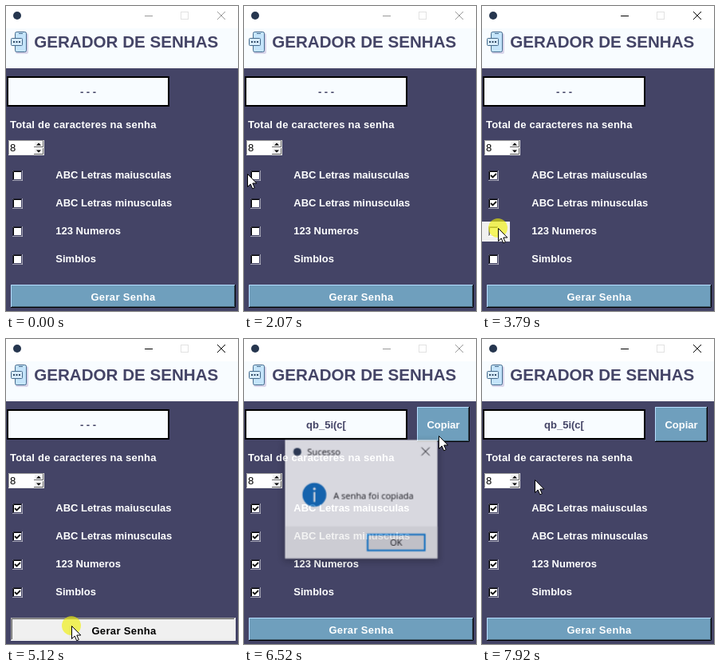
Recreate the animation shown at these times as an HTML page. Size 291 by 382 pixels, loop 7990 ms.

```html
<!DOCTYPE html>
<html lang="pt">
<head>
<meta charset="utf-8">
<title>Gerador de senhas</title>
<style>
  html, body { margin: 0; width: 100%; height: 100%; overflow: hidden; background: #446; }
  svg { display: block; width: 291px; height: 382px; }
  text { font: bold 13px "Liberation Sans", Arial, sans-serif; fill: #feffff; white-space: pre; }
  .mid { text-anchor: middle; }
  .dark { fill: #446; }
  .black { fill: #000; }
  #heading { font-size: 20.6px; }
  #total { letter-spacing: .22px; }
  #gerar text { letter-spacing: .35px; }
  #count { font-weight: normal; }
  #dialog { transform-origin: 147px 200.5px; }
  #dialog text { font: 11.1px "Open Sans", "Noto Sans", sans-serif; fill: #111; }
  .line { fill: none; stroke-width: 1; }
</style>
</head>
<body>
<svg viewBox="0 0 291 382" xmlns="http://www.w3.org/2000/svg">
  <defs>
    <filter id="soft" x="-20%" y="-20%" width="140%" height="140%"><feGaussianBlur stdDeviation="5"/></filter>
    <path id="buttons" class="line" d="M174 12.5H184M265 7L275 17M275 7L265 17"/>
  </defs>

  <rect width="291" height="382" fill="#446"/>
  <rect width="291" height="78" fill="#f8fcff"/>
  <rect width="291" height="28" fill="#fff"/>

  <circle cx="14" cy="12" r="5" fill="#26364f"/>
  <rect class="line" x="219.5" y="7.5" width="9" height="9" stroke="#e2e2e2"/>
  <use href="#buttons" stroke="#999"/>
  <use href="#buttons" id="active" stroke="#000"/>

  <g id="phone">
    <rect x="12" y="34" width="16" height="26" rx="2.5" fill="#d9d5ea"/>
    <rect x="11.5" y="32.5" width="14" height="25" rx="2" fill="#c4e4fa" stroke="#456a8c"/>
    <path d="M16 34.5H21" stroke="#456a8c"/>
    <rect x="6.5" y="40.5" width="14" height="9" rx="1" fill="#d8ecfb" stroke="#456a8c"/>
    <path d="M9 45H19" stroke="#2f4a66" stroke-width="2" stroke-dasharray="2 1.5"/>
  </g>
  <text id="heading" class="dark" x="35.2" y="52">GERADOR DE SENHAS</text>

  <rect x="2" y="89" width="202" height="36" fill="#f8fcff" stroke="#000" stroke-width="2"/>
  <text id="empty" class="mid dark" x="103" y="112">- - -</text>
  <text id="secret" class="mid dark" x="103" y="112">qb_5i(c[</text>
  <text id="total" x="5" y="153">Total de caracteres na senha</text>

  <g id="widgets"></g>

  <g id="dialog">
    <rect x="49" y="128" width="196" height="151" fill="#000" opacity=".3" filter="url(#soft)"/>
    <rect x="51" y="126" width="192" height="149" fill="#fff"/>
    <rect x="51" y="235" width="192" height="40" fill="#f0f0f0"/>
    <circle cx="66.5" cy="141" r="5" fill="#26364f"/>
    <text x="79" y="145">Sucesso</text>
    <path class="line" d="M223 135.5L233 145.5M233 135.5L223 145.5" stroke="#000"/>
    <circle cx="88" cy="195" r="15" fill="#0a6cc0"/>
    <path d="M88 191.5V204" stroke="#fff" stroke-width="2.2"/>
    <circle cx="88" cy="187.5" r="1.6" fill="#fff"/>
    <text x="112" y="200">A senha foi copiada</text>
    <rect x="155" y="245" width="72" height="20" fill="#e1e1e1" stroke="#0078d7" stroke-width="2"/>
    <rect id="okHover" x="156" y="246" width="70" height="18" fill="#e5f1fb"/>
    <text class="mid" x="191" y="259">OK</text>
  </g>

  <g id="cursor">
    <circle id="click" r="12" fill="#f0f000" fill-opacity=".62"/>
    <path d="M.5 .5V16.5L4.2 13L6.7 18.8L9.3 17.7L6.8 12H11.8Z" fill="#fff" stroke="#000"/>
  </g>
</svg>

<script>
const $ = id => document.getElementById(id);

// ---- widgets ----
// A relief lists [top-left, bottom-right] colours from the outer edge inwards.
const RAISED = [['#fff', '#696969'], ['#e3e3e3', '#a0a0a0']];
const SUNKEN = [['#a0a0a0', '#fff'], ['#696969', '#e3e3e3']];
const BLUE = [['#b7deff', '#000'], ['#6f9fbd', '#435f71']];
const DARK = [['#29293d', '#a1a1b2'], ['#000', '#446']];
const THIN = [['#a0a0a0', '#e3e3e3']];
const ARROW = [['#fff', '#696969']];

const bevel = (x, y, w, h, fill, relief) =>
  `<rect x="${x}" y="${y}" width="${w}" height="${h}" fill="${fill}"/>`
  + relief.map(([tl, br], i) => {
    const [l, t, r, b] = [x + i + .5, y + i + .5, x + w - i - .5, y + h - i - .5];
    return `<path class="line" stroke="${tl}" d="M${l} ${b}V${t}H${r}"/>
      <path class="line" stroke="${br}" d="M${l - .5} ${b}H${r}V${t - .5}"/>`;
  }).join('');

const button = (name, label, x, y, w, h) => {
  const face = (state, fill, relief, shift, cls) =>
    `<g id="${name}${state}">${bevel(x, y, w, h, fill, relief)}
     <text class="mid ${cls}" x="${x + w / 2 + shift}" y="${y + h / 2 + 5 + shift}">${label}</text></g>`;
  return `<g id="${name}">`
    + face('Idle', '#6f9fbd', BLUE, 0, '')
    + face('Hover', '#f0f0f0', RAISED, 0, 'black')
    + face('Press', '#f0f0f0', SUNKEN, 1, 'black') + '</g>';
};

const option = (label, i) => {
  const y = 200 + i * 35;
  return bevel(8, y + 6, 13, 13, '#fff', DARK)
    + `<g id="hover${i}"><rect y="${y}" width="35" height="25" fill="#f0f0f0"/>
      ${bevel(8, y + 6, 13, 13, '#fff', SUNKEN)}</g>
    <path id="tick${i}" class="line" d="M11 ${y + 12}l2.5 2.5l4.5 -4.5" stroke="#111" style="stroke-width:1.8"/>
    <text x="62.3" y="${y + 16}">${label}</text>`;
};

const spinner = bevel(3, 168, 45, 19, '#fff', THIN)
  + '<text id="count" class="black" x="5" y="182">8</text>'
  + [169, 178].map(y => bevel(35, y, 12, 8, '#f0f0f0', ARROW)).join('')
  + '<path d="M38 174.5h6l-3 -3zM38 180.5h6l-3 3z"/>';

const labels = ['ABC Letras maiusculas', 'ABC Letras minusculas', '123 Numeros', 'Simblos'];
$('widgets').innerHTML = spinner
  + labels.map(option).join('')
  + button('gerar', 'Gerar Senha', 6, 349, 282, 29)
  + button('copiar', 'Copiar', 217, 85, 66, 44);

// ---- motion, all times in ms ----
const LOOP = 7990, TICK = 75, PRESS = 155;

// Where the pointer goes, in how many jumps, and when it presses there.
const stops = [
  { go: 1060, jumps: 11, x: 106, y: 273 },
  { go: 1920, jumps: 3, x: 4, y: 210 },
  { go: 2240, jumps: 2, x: 12, y: 212, press: 2450 },
  { go: 2780, jumps: 4, x: 18, y: 244, press: 3090 },
  { go: 3400, jumps: 4, x: 20, y: 278, press: 3790 },
  { go: 4030, jumps: 5, x: 20, y: 310, press: 4500 },
  { go: 4740, jumps: 4, x: 82, y: 359, press: 5120 },
  { go: 5590, jumps: 7, x: 244, y: 121, press: 6220 },
  { go: 6600, jumps: 5, x: 204, y: 263, press: 7070 },
  { go: 7460, jumps: 7, x: 66, y: 176 }
];
const clicks = stops.filter(s => s.press);
const rows = clicks.slice(0, labels.length);
const [make, copy, ok] = clicks.slice(labels.length);
const arrival = s => s.go + (s.jumps - 1) * TICK;
const release = s => s.press + PRESS;

const play = (id, frames) => $(id).animate(frames, { duration: LOOP, iterations: Infinity });
const at = (t, props, easing = 'step-end') => ({ offset: t / LOOP, easing, ...props });

const show = (id, ...spans) => play(id, [
  at(0, { opacity: +(spans[0][0] === 0) }),
  ...spans.flatMap(([on, off]) => [
    ...(on ? [at(on, { opacity: 1 })] : []),
    ...(off < LOOP ? [at(off, { opacity: 0 })] : [])
  ]),
  at(LOOP, { opacity: +(spans.at(-1)[1] === LOOP) })
]);

const pressable = (name, stop, leave) => {
  show(name + 'Hover', [arrival(stop), leave]);
  show(name + 'Press', [stop.press, release(stop)]);
};

// Pointer
const start = { x: 295, y: 360 };
const move = ({ x, y }) => ({ transform: `translate(${x}px, ${y}px)` });
play('cursor', [
  at(0, move(start)),
  ...stops.flatMap((s, i) => [
    at(s.go, move(stops[i - 1] || start), `steps(${s.jumps}, start)`),
    at(s.go + s.jumps * TICK, move(s))
  ]),
  at(LOOP, move(stops.at(-1)))
]);
show('cursor', [stops[0].go, LOOP]);
show('click', ...clicks.map(s => [s.press, release(s)]));

// Checkboxes: the first click only wakes the window, so its row stays dark
rows.forEach((s, i) => {
  show('tick' + i, [release(s), LOOP]);
  if (i) show('hover' + i, [s.press - TICK, release(s) + 2 * TICK]);
  else $('hover0').remove();
});

// Buttons and password
pressable('gerar', make, copy.go + TICK);
pressable('copiar', copy, release(copy));
show('empty', [0, release(make)]);
show('secret', [release(make), LOOP]);
show('copiar', [release(make), LOOP]);

// Message box
const opened = release(copy) - 45, closed = release(ok), fade = 240;
const gone = { opacity: 0, transform: 'scale(.98)' };
const full = { opacity: 1, transform: 'scale(1)' };
play('dialog', [
  at(0, gone),
  at(opened, gone, 'linear'), at(opened + fade, full),
  at(closed, full, 'linear'), at(closed + fade * 1.3, gone),
  at(LOOP, gone)
]);
show('okHover', [arrival(ok), LOOP]);
show('active', [rows[0].press, opened], [closed, LOOP]);
</script>
</body>
</html>
```
